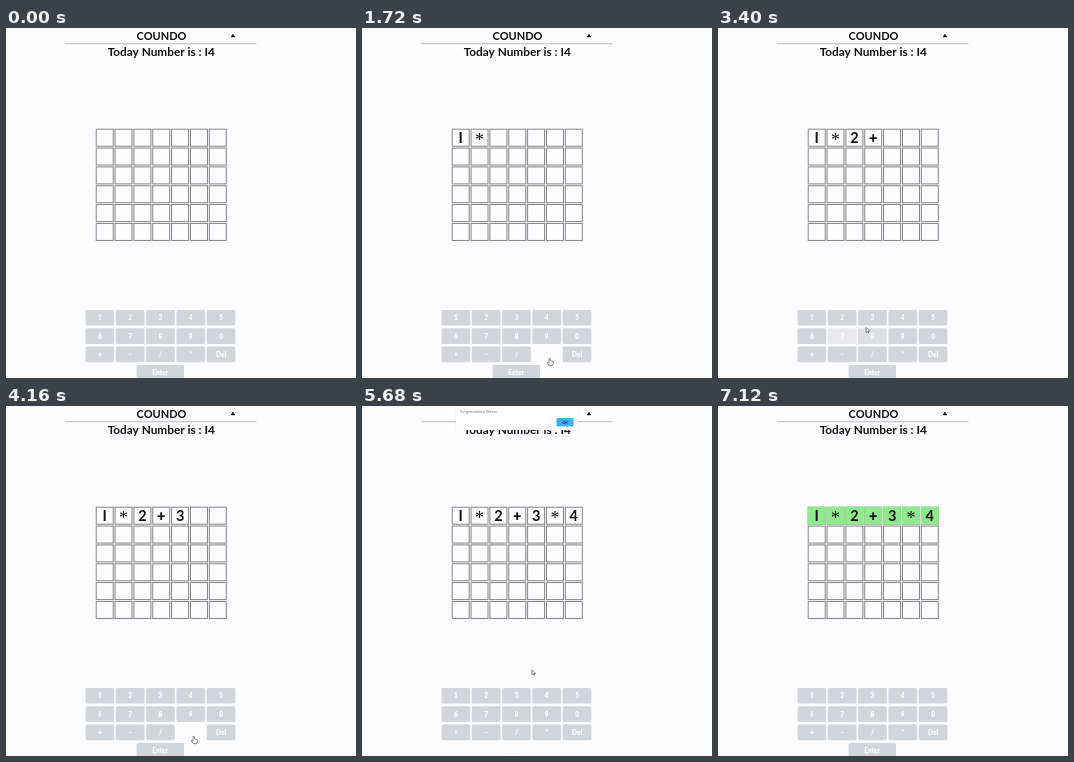
Recreate the animation shown at these times as an HTML page with a canvas. Size 350 by 350 pixels, loop 7200 ms.

```html
<!DOCTYPE html>
<html lang="en">
<head>
<meta charset="utf-8">
<title>Number puzzle</title>
<style>
html, body { margin: 0; width: 100%; height: 100%; overflow: hidden; background: #fdfcfe; }
canvas { display: block; }
</style>
</head>
<body>
<canvas id="stage" width="350" height="350"></canvas>
<script>
const ctx = document.getElementById('stage').getContext('2d');
const LOOP = 7200, START = 40, REST = 160, FADE = 100;
const DIALOG_OPEN = 5400, DIALOG_CLOSE = 6660;
const SANS = 'Lato, sans-serif';
const SERIF = '"Liberation Serif", serif';
const INK = '#111';

const KEY_H = 15.6;
const keys = [...'1234567890+-/*', 'Del'].map((label, i) => ({
  label, x: 79.5 + (i % 5) * 30.3, y: 282 + Math.floor(i / 5) * 18.3, w: 28.7
}));
keys.push({ label: 'Enter', x: 130.5, y: 337, w: 47.5 });
const okButton = { label: 'OK', x: 194.5, y: 12, w: 17 };

// Where the pointer goes: key, arrival, press
const visit = (label, arrive, press) => {
  const b = [...keys, okButton].find(key => key.label === label);
  return { label, arrive, press, leave: press + REST, x: b.x + b.w / 2 + 3, y: b.y + KEY_H / 2 + 4 };
};
const presses = [
  visit('1', 760, 880), visit('*', 1440, 1700), visit('2', 2480, 2690),
  visit('+', 2980, 3000), visit('3', 3480, 3560), visit('*', 4140, 4320),
  visit('4', 4640, 4700), visit('Enter', 5140, 5320), visit('OK', 6080, 6500)
];
const stops = [
  { x: 312, y: 306, leave: START },
  ...presses,
  { x: 200, y: -10, arrive: 6860, leave: LOOP }
];
const typed = presses.filter(p => p.label.length === 1);

const clamp = v => Math.max(0, Math.min(1, v));
const smooth = v => v * v * (3 - 2 * v);

function pointerAt(t) {
  const i = Math.max(1, stops.findIndex(s => s.leave > t));
  const from = stops[i - 1], to = stops[i];
  const k = smooth(clamp((t - from.leave) / (to.arrive - from.leave)));
  return { x: from.x + (to.x - from.x) * k, y: from.y + (to.y - from.y) * k };
}

const over = (p, b) => p.x >= b.x && p.x <= b.x + b.w && p.y >= b.y && p.y <= b.y + KEY_H;
const dialogShown = t => t >= DIALOG_OPEN && t < DIALOG_CLOSE;

// Share of the last moments spent on a key; the page is frozen behind the dialog
function hoverGlow(key, t) {
  const samples = 20;
  let hits = 0;
  for (let i = 0; i < samples; i++) {
    const s = t - FADE * i / samples;
    if (over(pointerAt(dialogShown(s) ? DIALOG_OPEN : s), key)) hits++;
  }
  return hits / samples;
}

function text(str, x, y, font, color = INK, align = 'center') {
  ctx.font = font;
  ctx.fillStyle = color;
  ctx.textAlign = align;
  ctx.fillText(str, x, y);
}

function box(x, y, w, h, r, color) {
  ctx.fillStyle = color;
  ctx.beginPath();
  ctx.roundRect(x, y, w, h, r);
  ctx.fill();
}

function header() {
  text('COUNDO', 155.5, 11.5, `700 11px ${SANS}`);
  box(59, 15.3, 191.5, 1, 0, '#b9bbc1');
  box(225.9, 6.2, 2.2, 2.4, 1, INK);
  box(225, 7.8, 4, 1.4, 0.6, INK);
  text('Today Number is : I4', 155.2, 28, `700 11.8px ${SANS}`);
}

function grid(t) {
  const pitch = 18.85, size = 17;
  const green = smooth(clamp((t - DIALOG_CLOSE) / 380));
  ctx.lineWidth = 1;
  ctx.strokeStyle = '#858585';
  for (let i = 0; i < 42; i++) {
    const x = 90.2 + (i % 7) * pitch, y = 101.2 + Math.floor(i / 7) * pitch;
    ctx.strokeRect(x, y, size, size);
    if (i < 7) box(x - 0.5, y - 0.5, size + 1, size + 1, 0, `rgba(144, 233, 140, ${green})`);
  }
  typed.forEach(({ label, press }, i) => {
    if (t < press) return;
    const x = 98.7 + i * pitch;
    if (label === '*') text(label, x, 117.5, `400 18px ${SERIF}`);
    else text(label === '1' ? 'I' : label, x, 114.8, `${label === '+' ? 900 : 700} 14.5px ${SANS}`);
  });
}

function keyboard(t) {
  for (const key of keys) {
    ctx.globalAlpha = 1 - hoverGlow(key, t);
    box(key.x, key.y, key.w, KEY_H, 1.5, '#d2d5d9');
    ctx.globalAlpha = 1;
    text(key.label, key.x + key.w / 2, key.y + 10.2, `900 6.5px ${SANS}`, '#fff');
  }
}

function dialog() {
  ctx.shadowColor = 'rgba(0, 0, 0, .12)';
  ctx.shadowBlur = 2;
  box(94, -3, 122, 27, 1, '#fff');
  ctx.shadowBlur = 0;
  text('Congratulations Winner', 98, 6.8, `400 3.6px ${SANS}`, '#777', 'left');
  box(okButton.x, okButton.y, okButton.w, 8.5, 1, '#35b5f0');
  text('OK', 203, 17.6, `700 3.8px ${SANS}`, '#124');
}

function pointer(t) {
  const p = pointerAt(t);
  const hand = !dialogShown(t) && keys.some(key => over(p, key));
  ctx.save();
  ctx.translate(p.x, p.y);
  const outline = new Path2D(hand
    ? 'M-.6 0H.6L.8 2.6L3.6 3.3L3.5 5.5L2.7 7.3H-.6L-2.5 4.2L-.8 4.6Z'
    : 'M0 0V5L1.2 4L2 5.6L2.7 5.2L2 3.7L3.6 3.6Z');
  ctx.fillStyle = '#fff';
  ctx.fill(outline);
  ctx.strokeStyle = '#444';
  ctx.lineWidth = 0.6;
  ctx.stroke(outline);
  ctx.restore();
}

function frame(now) {
  const t = now % LOOP;
  ctx.fillStyle = '#fdfcfe';
  ctx.fillRect(0, 0, 350, 350);
  header();
  grid(t);
  keyboard(t);
  if (dialogShown(t)) dialog();
  if (t >= START) pointer(t);
  requestAnimationFrame(frame);
}
requestAnimationFrame(frame);
</script>
</body>
</html>
```
